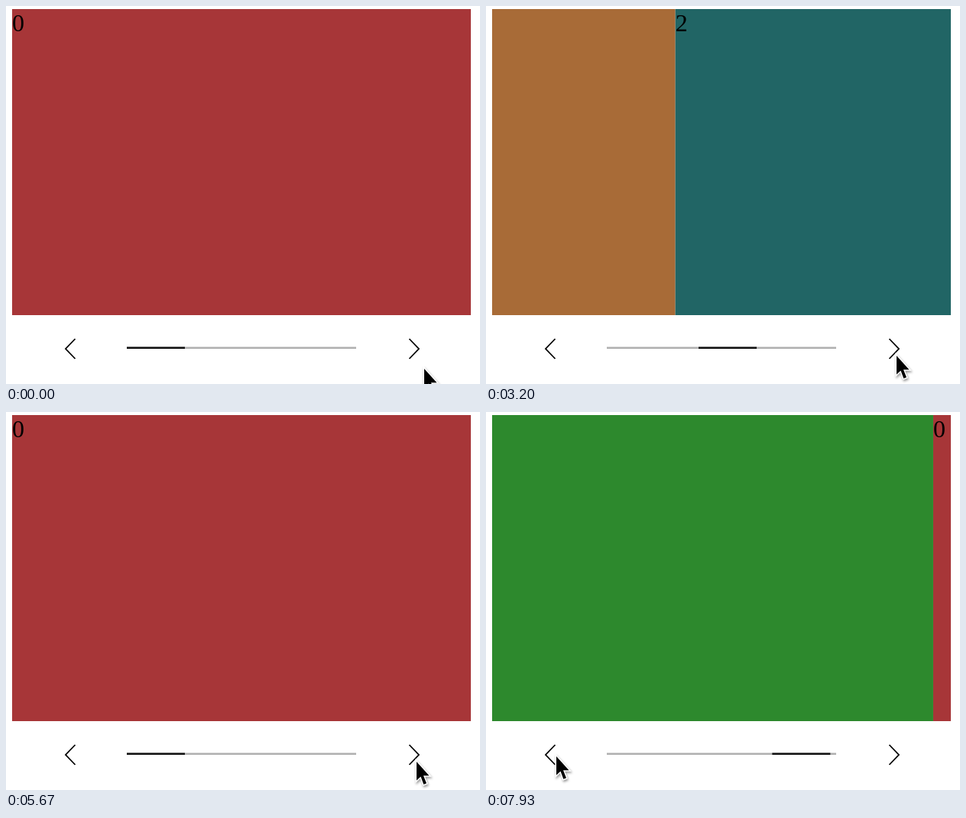
An HTML page for the animation above (8000 ms loop, 620 by 494 pixels).

```html
<!DOCTYPE html>
<html lang="en">
<head>
<meta charset="utf-8">
<title>Slider</title>
<style>
  html, body { margin: 0; width: 100%; height: 100%; overflow: hidden; background: #fff; }
  svg { display: block; }
  text { font: 32px "Liberation Serif", "Times New Roman", serif; }
  .arrow { fill: none; stroke: #000; stroke-width: 1.8; }
  #cursor { filter: drop-shadow(1px 2px 1.5px rgba(0, 0, 0, .4)); }
</style>
</head>
<body>
<svg width="620" height="494" viewBox="0 0 620 494">
  <clipPath id="view"><rect x="8" y="4" width="600" height="400"/></clipPath>
  <g clip-path="url(#view)">
    <g class="slide"><rect width="600" height="400" fill="#a73638"/><text y="28.5">0</text></g>
    <g class="slide"><rect width="600" height="400" fill="#a86b37"/><text y="28.5">1</text></g>
    <g class="slide"><rect width="600" height="400" fill="#216565"/><text y="28.5">2</text></g>
    <g class="slide"><rect width="600" height="400" fill="#2d892d"/><text y="28.5">3</text></g>
  </g>
  <rect x="158" y="445.5" width="300" height="2.5" fill="#b0b0b0"/>
  <rect id="thumb" y="445.5" width="76" height="2.5" fill="#111"/>
  <polyline class="arrow" points="90.5,435 78,448 90.5,461"/>
  <polyline class="arrow" points="527.5,435 540,448 527.5,461"/>
  <g id="cursor">
    <path d="M0 0V24.5L5.5 19.5L9.3 29.8L13 28.3L9 18.3H16.5Z"
      fill="#000" stroke="#fff" stroke-width="3" paint-order="stroke"/>
  </g>
</svg>
<script>
const LOOP = 8000, FPS = 15, SLIDE_MS = 400, WIDTH = 600, COUNT = 4;

// [start ms, direction]
const moves = [
  [2419, 1], [3061, 1], [4058, 1], [4870, 1], [5668, 1], [6973, -1], [7632, -1]
];

// [ms, x, y] of the pointer tip
const path = [
  [0, 547, 474], [67, 547, 486], [133, 546, 502], [600, 548, 502],
  [667, 548, 490], [933, 545, 476], [1333, 537, 457], [6200, 537, 457],
  [6330, 505, 466], [6470, 400, 478], [6670, 200, 472], [6870, 92, 450], [LOOP, 92, 450]
];

const slides = [...document.querySelectorAll(".slide")];
const thumb = document.getElementById("thumb");
const cursor = document.getElementById("cursor");
const lerp = (a, b, k) => a + (b - a) * k;

// CSS "ease": cubic-bezier(.25, .1, .25, 1)
function ease(x) {
  if (x <= 0) return 0;
  if (x >= 1) return 1;
  const curve = (s, a, b) => 3 * (1 - s) * (1 - s) * s * a + 3 * (1 - s) * s * s * b + s ** 3;
  let lo = 0, hi = 1;
  for (let i = 0; i < 24; i++) {
    const mid = (lo + hi) / 2;
    if (curve(mid, .25, .25) < x) lo = mid; else hi = mid;
  }
  return curve(lo, .1, 1);
}

function slideState(t) {
  let from = 0, to = 0, dir = 1, q = 1;
  for (const [start, step] of moves) {
    if (t < start) break;
    from = to;
    to = (from + step + COUNT) % COUNT;
    dir = step;
    q = ease((t - start) / SLIDE_MS);
  }
  return { from, to, dir, q };
}

function pointer(t) {
  const i = Math.max(1, path.findIndex(p => p[0] >= t));
  const [t0, x0, y0] = path[i - 1], [t1, x1, y1] = path[i];
  const k = (t - t0) / (t1 - t0);
  return [lerp(x0, x1, k), lerp(y0, y1, k)];
}

function place(slide, x) {
  slide.setAttribute("transform", `translate(${8 + x} 4)`);
  slide.style.display = "";
}

function draw(t) {
  const { from, to, dir, q } = slideState(t);
  slides.forEach(s => s.style.display = "none");
  if (q < 1) place(slides[from], -dir * q * WIDTH);
  place(slides[to], dir * (1 - q) * WIDTH);
  thumb.setAttribute("x", 158 + 75 * lerp(from, to, q));
  cursor.setAttribute("transform", `translate(${pointer(t)})`);
}

const begin = performance.now();
function tick() {
  const t = Math.max(0, performance.now() - begin) % LOOP;
  const step = Math.min(Math.floor((t + 4) * FPS / 1000), LOOP * FPS / 1000 - 1);
  draw(step * 1000 / FPS);
  requestAnimationFrame(tick);
}
tick();
</script>
</body>
</html>
```
